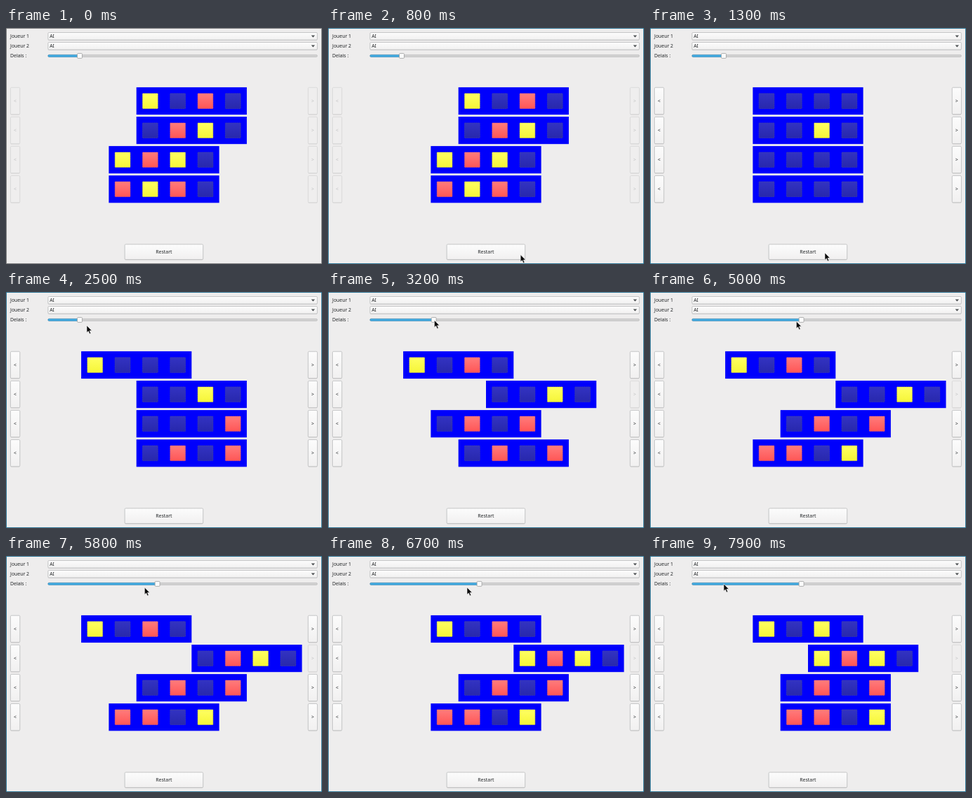
These frames come from a looping animation (450 px wide and 338 px high, 8 s). An HTML page:

```html
<!DOCTYPE html>
<html lang="fr">
<head>
<meta charset="utf-8">
<title>Jeu de rangées</title>
<style>
html, body { margin: 0; width: 100%; height: 100%; overflow: hidden; background: #eeeded; }
svg { display: block; width: 450px; height: 338px; }
text { font: 6.9px "Noto Sans", "Open Sans", sans-serif; fill: #242729; }
.mid { text-anchor: middle; }
.box { fill: url(#face); stroke: #b9babb; stroke-width: .8; }
.off .box { fill: #efeeee; stroke: #d6d6d6; }
.off text { fill: #bfc0c1; }
.cell { stroke-width: .7; stroke-dasharray: 1 .6; }
</style>
</head>
<body>
<svg id="stage" viewBox="0 0 450 338">
  <defs id="defs"></defs>
</svg>
<script>
const LOOP = 8000, TICK = 100;
const LEFT = 146.4, TOP = 84.9, PITCH = 39.3, ROW = 42.1;
const stage = document.getElementById('stage');

function add(tag, attrs, parent = stage, content) {
  const el = document.createElementNS('http://www.w3.org/2000/svg', tag);
  for (const k in attrs) el.setAttribute(k, attrs[k]);
  if (content) el.textContent = content;
  return parent.appendChild(el);
}
const rect = (x, y, width, height, attrs, parent) =>
  add('rect', { x, y, width, height, ...attrs }, parent);
const label = (x, y, content, cls = '', parent) =>
  add('text', { x, y, class: cls }, parent, content);

function gradient(id, from, to) {
  const g = add('linearGradient', { id, x2: 0, y2: 1 }, document.getElementById('defs'));
  add('stop', { offset: 0, 'stop-color': from }, g);
  add('stop', { offset: 1, 'stop-color': to }, g);
}
gradient('face', '#fcfcfc', '#f1f0f0');
gradient('yellow', '#ffff62', '#f5f538');
gradient('red', '#ff7c7c', '#ff5656');
gradient('empty', '#3333c2', '#2828ac');

const paint = {
  Y: ['url(#yellow)', '#d6d640'],
  R: ['url(#red)', '#e06078'],
  '.': ['url(#empty)', '#4a4a9c']
};

// A raised control with a soft lower edge
function button(x, y, w, h, caption) {
  const g = add('g', {});
  rect(x, y + .8, w, h, { rx: 1.5, fill: '#d3d2d2' }, g);
  rect(x, y, w, h, { rx: 1.5, class: 'box' }, g);
  label(x + w / 2, y + h / 2 + 2.5, caption, 'mid', g);
  return g;
}

// Settings
['Joueur 1', 'Joueur 2'].forEach((name, i) => {
  const y = 6.5 + i * 14;
  label(6, y + 7.9, name);
  rect(59.9, y + .7, 383.4, 10.6, { rx: 1.3, fill: '#d3d2d2' });
  rect(59.9, y, 383.4, 10.6, { rx: 1.3, class: 'box' });
  label(62.2, y + 7.9, 'AI');
  add('path', { d: `M434.6 ${y + 4}h5.4l-2.7 2.9z`, fill: '#4b4e50' });
});
label(6, 42.4, 'Delais :');
rect(59.9, 38.4, 383.4, 3, { rx: 1.4, fill: '#d2d2d2', stroke: '#b2b3b4', 'stroke-width': .6 });
const fill = rect(59.9, 38.4, 0, 3, { rx: 1.4, fill: '#43aee5', stroke: '#3385b4', 'stroke-width': .6 });
const knob = rect(0, 36.4, 7, 7, { rx: 1.2, fill: '#fbfbfb', stroke: '#9c9d9e', 'stroke-width': .8 });

// Board and side buttons
const rows = [0, 1, 2, 3].map(r => {
  const y = TOP + r * ROW;
  const group = add('g', {});
  rect(LEFT, y, PITCH * 4, 39.2, { fill: '#0000fc' }, group);
  const cells = [0, 1, 2, 3].map(c =>
    rect(LEFT + PITCH * (c + .5) - 10.9, y + 8.9, 21.8, 21.6, { class: 'cell', rx: .6 }, group));
  return {
    group, cells,
    left: button(6.4, y + .3, 13.4, 38.4, '<'),
    right: button(430.2, y + .3, 13.2, 38.4, '>')
  };
});
button(169.1, 309.8, 111.6, 21.8, 'Restart');

const frame = rect(.5, .5, 449, 337, { fill: 'none' });
const arrow = add('path', {
  d: 'M0 0V10.2L2.3 8.1 4 12 5.8 11.2 4.1 7.5H7.3Z',
  fill: '#080808', stroke: '#f8f8f8', 'stroke-width': .6
});

// Time, row offsets, cells row by row
const states = [
  [0,    [1, 1, 0, 0],  'Y.R..RY.YRY.RYR.'],
  [1100, [0, 0, 0, 0],  '................'],
  [1200, [0, 0, 0, 0],  '......Y.........'],
  [1500, [0, 0, 0, 1],  '......Y......R..'],
  [1700, [-1, 0, 0, 1], 'Y.....Y......R..'],
  [1900, [-1, 1, 0, 1], 'Y.....Y......R.R'],
  [2100, [-1, 1, 1, 1], 'Y.....Y......R.R'],
  [2300, [-1, 1, 1, 1], 'Y.....Y....R.R.R'],
  [2700, [-1, 2, 1, 1], 'Y.....Y....R.R.R'],
  [3000, [-1, 2, 0, 1], 'Y.R...Y..R.R.R.R'],
  [3300, [-1, 3, 0, 1], 'Y.R...Y..R.YRR.R'],
  [3700, [-1, 3, 0, 0], 'Y.R...Y..R.YRR.Y'],
  [4700, [-1, 3, 1, 0], 'Y.R...Y..R.RRR.Y'],
  [5300, [-1, 3, 1, 0], 'Y.R..RY..R.RRR.Y'],
  [6100, [0, 3, 1, 0],  'Y.R..RY..R.RRR.Y'],
  [6500, [0, 3, 1, 0],  'Y.R.YRY..R.RRR.Y'],
  [7000, [0, 3, 1, 1],  'Y.R.YRY..R.RRR.Y'],
  [7300, [0, 2, 1, 1],  'Y.R.YRY..R.RRR.Y'],
  [7700, [0, 2, 1, 1],  'Y.Y.YRY..R.RRR.Y']
];

// Time, x, y
const pointer = [
  [300, 400, 338], [900, 249, 322], [1500, 249, 322], [2000, 150, 120],
  [2300, 118, 52], [2500, 115, 48], [2900, 106, 40], [3600, 212, 41],
  [4100, 243, 41], [4500, 214, 40], [4800, 216, 40], [5300, 197, 45],
  [6700, 198, 45], [7200, 150, 36], [7500, 122, 30], [7900, 105, 40]
];
const slider = [[2900, 105], [3600, 211.6], [4500, 211.6], [4800, 215.6]];

function ease(track, t, k) {
  const i = track.findIndex(p => p[0] > t);
  if (i < 0) return track[track.length - 1][k];
  if (i === 0) return track[0][k];
  const a = track[i - 1], b = track[i];
  return a[k] + (b[k] - a[k]) * (t - a[0]) / (b[0] - a[0]);
}

function draw(t) {
  const [, offsets, cells] = states.filter(s => s[0] <= t).pop();
  const over = t < 1100;
  rows.forEach((row, r) => {
    row.group.setAttribute('transform', `translate(${offsets[r] * PITCH} 0)`);
    row.cells.forEach((cell, c) => {
      const [face, edge] = paint[cells[r * 4 + c]];
      cell.setAttribute('fill', face);
      cell.setAttribute('stroke', edge);
    });
    row.left.setAttribute('class', over ? 'off' : '');
    row.right.setAttribute('class', over || offsets[r] > 1 ? 'off' : '');
  });
  const x = ease(slider, t, 1);
  fill.setAttribute('width', x - 59.9);
  knob.setAttribute('x', x - 3.5);
  frame.setAttribute('stroke', t < 600 ? '#77787a' : '#2b7293');
  arrow.setAttribute('visibility', t < 300 ? 'hidden' : 'visible');
  arrow.setAttribute('transform', `translate(${ease(pointer, t, 1)} ${ease(pointer, t, 2)})`);
}

const start = performance.now();
function loop() {
  const t = (performance.now() - start) % LOOP;
  draw(Math.floor(t / TICK) * TICK);
  requestAnimationFrame(loop);
}
loop();
</script>
</body>
</html>
```
